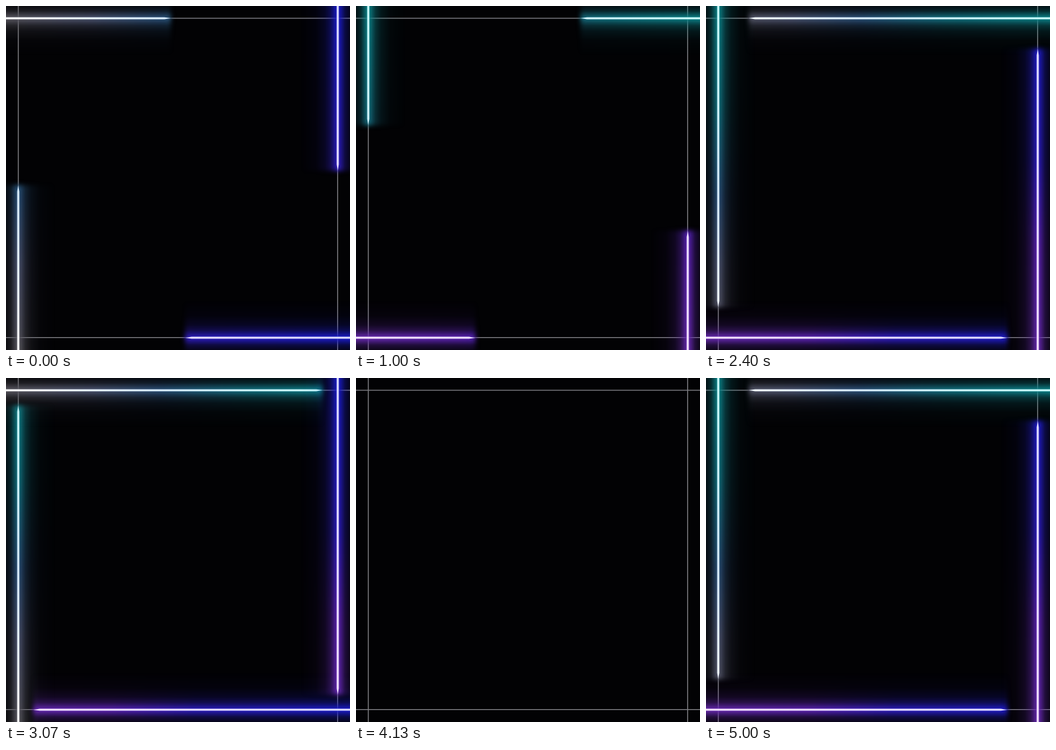
An HTML page for the animation above (5.07 s loop, 480 by 480 pixels).

```html
<!DOCTYPE html>
<html lang="en">
<head>
<meta charset="utf-8">
<title>Neon frame</title>
<style>
  html, body { margin: 0; width: 100%; height: 100%; overflow: hidden; background: #020204; }
  svg { display: block; width: 100vw; height: 100vh; }
</style>
</head>
<body>
<svg viewBox="0 0 480 480" xmlns="http://www.w3.org/2000/svg">
  <defs>
    <linearGradient id="cool" gradientUnits="userSpaceOnUse" x1="0" x2="480">
      <stop offset="0" stop-color="#0c868c"/>
      <stop offset=".3" stop-color="#12707f"/>
      <stop offset=".55" stop-color="#2a5078"/>
      <stop offset=".75" stop-color="#4c5470"/>
      <stop offset="1" stop-color="#5c5a62"/>
    </linearGradient>
    <linearGradient id="warm" gradientUnits="userSpaceOnUse" x1="0" x2="480">
      <stop offset="0" stop-color="#6a2ab4"/>
      <stop offset=".3" stop-color="#5c22b4"/>
      <stop offset=".55" stop-color="#2c1cc0"/>
      <stop offset="1" stop-color="#1a1cd0"/>
    </linearGradient>
    <linearGradient id="coolCore" gradientUnits="userSpaceOnUse" x1="0" x2="480">
      <stop offset="0" stop-color="#c8ffff"/>
      <stop offset=".55" stop-color="#d8ecff"/>
      <stop offset="1" stop-color="#ffffff"/>
    </linearGradient>
    <linearGradient id="warmCore" gradientUnits="userSpaceOnUse" x1="0" x2="480">
      <stop offset="0" stop-color="#f4e2ff"/>
      <stop offset="1" stop-color="#dcdcff"/>
    </linearGradient>
    <!-- brightness of the glow across a bar -->
    <linearGradient id="falloff" gradientUnits="userSpaceOnUse" x1="0" x2="0" y1="0" y2="70">
      <stop offset="0" stop-color="#fff" stop-opacity=".12"/>
      <stop offset=".1" stop-color="#fff" stop-opacity=".32"/>
      <stop offset=".19" stop-color="#fff" stop-opacity=".75"/>
      <stop offset=".245" stop-color="#fff"/>
      <stop offset=".3" stop-color="#fff" stop-opacity=".75"/>
      <stop offset=".39" stop-color="#fff" stop-opacity=".38"/>
      <stop offset=".5" stop-color="#fff" stop-opacity=".17"/>
      <stop offset=".68" stop-color="#fff" stop-opacity=".05"/>
      <stop offset="1" stop-color="#fff" stop-opacity="0"/>
    </linearGradient>
    <mask id="band" maskUnits="userSpaceOnUse" x="-30" y="0" width="540" height="70" style="mask-type: alpha">
      <rect x="-30" width="540" height="70" fill="url(#falloff)"/>
    </mask>
    <filter id="soft" filterUnits="userSpaceOnUse" x="-60" y="-20" width="600" height="110" color-interpolation-filters="sRGB">
      <feGaussianBlur stdDeviation="3 0"/>
    </filter>
  </defs>
  <rect width="480" height="480" fill="#020204"/>
  <path d="M0 17.2H480M0 462.6H480M17.2 0V480M462.7 0V480" stroke="#7e7e82" stroke-width="1.3"/>
  <g id="bars"></g>
</svg>
<script>
  const NS = 'http://www.w3.org/2000/svg';
  const SIZE = 480, LINE = 17.1, FPS = 15, LOOP = 5070;

  function add(parent, tag, attrs) {
    const node = document.createElementNS(NS, tag);
    for (const key in attrs) node.setAttribute(key, attrs[key]);
    return parent.appendChild(node);
  }

  // Each bar runs along x in its own space: left, top, bottom, right.
  const bars = [
    ['cool', '0 1 1 0 0 0'],
    ['cool', '-1 0 0 1 480 0'],
    ['warm', '1 0 0 -1 0 480'],
    ['warm', '0 -1 -1 0 480 480']
  ].map(([tone, matrix]) => {
    const group = add(document.getElementById('bars'), 'g', { transform: `matrix(${matrix})` });
    const band = add(group, 'g', { mask: 'url(#band)' });
    return {
      group,
      glow: add(band, 'rect', { y: 0, height: 70, fill: `url(#${tone})`, filter: 'url(#soft)' }),
      core: add(group, 'path', { fill: `url(#${tone}Core)` })
    };
  });

  const easeOut = (u, power) => 1 - Math.pow(1 - Math.min(1, Math.max(0, u)), power);
  const grow = step => 3 + (SIZE - 3) * easeOut(step / 16, 2.12);
  const wipe = step => SIZE * easeOut((step + 1) / 16, 1.28);

  // Lit stretch of every bar at a given step.
  function litSpan(step) {
    if (step < 3) return [250 * Math.pow(1 - step / 3, 2.3), SIZE];
    if (step < 7) return [0, SIZE];
    if (step < 22) return [0, SIZE - wipe(step - 7)];
    if (step < 26) return [0, 0];
    if (step < 46) return [0, grow(step - 26)];
    if (step < 61) return [wipe(step - 46), SIZE];
    if (step < 65) return [0, 0];
    return [0, grow(step - 65)];
  }

  function render(ms) {
    const step = Math.floor((ms + 4) * FPS / 1000);
    let [from, to] = litSpan(step);
    const shown = to - from > 0.5;
    if (from <= 0) from = -24;
    if (to >= SIZE) to = SIZE + 24;
    const tip = 9, half = 1.45;
    const shape = `M${from} ${LINE}L${from + tip} ${LINE - half}H${to - tip}` +
      `L${to} ${LINE}L${to - tip} ${LINE + half}H${from + tip}Z`;
    for (const { group, glow, core } of bars) {
      group.setAttribute('visibility', shown ? 'visible' : 'hidden');
      glow.setAttribute('x', from);
      glow.setAttribute('width', to - from);
      core.setAttribute('d', shape);
    }
  }

  const start = performance.now();
  function tick() {
    render((performance.now() - start) % LOOP);
    requestAnimationFrame(tick);
  }
  tick();
</script>
</body>
</html>
```
